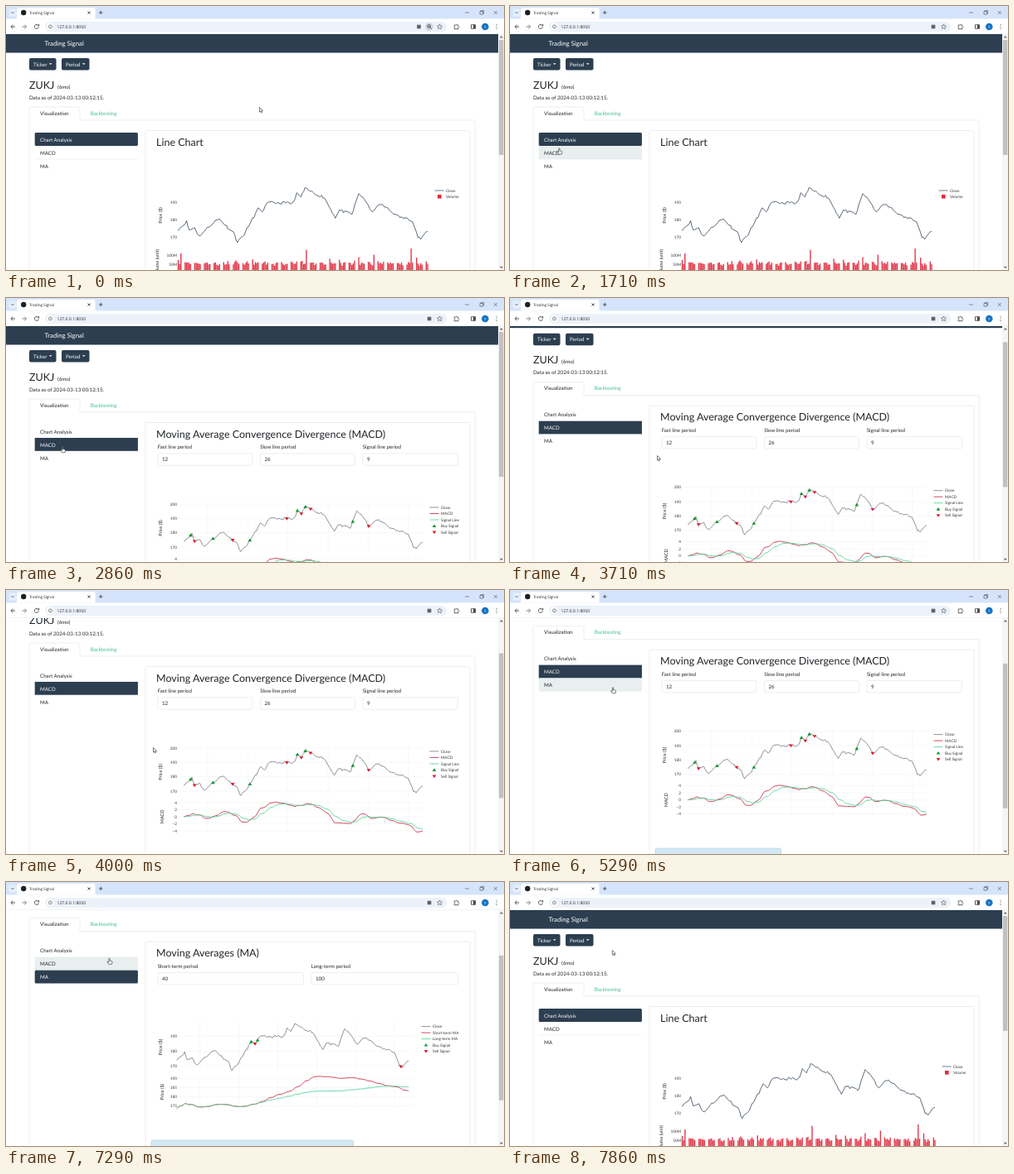
Animation of 600 by 319 pixels, one loop 8 s. Source, as an HTML page:

```html
<!DOCTYPE html>
<html lang="en">
<head>
<meta charset="utf-8">
<title>Trading Signal</title>
<style>
html, body { margin: 0; width: 100%; height: 100%; overflow: hidden; background: #fff; }
#stage { display: block; width: 600px; height: 319px; font: 6.2px Lato, sans-serif; text-rendering: geometricPrecision; }
text { fill: #212529; }
.ui { font-family: "Open Sans", sans-serif; }
.icon { fill: none; stroke: #474b50; stroke-width: .9; }
.thin { stroke-width: .6; }
.h { font-size: 12.5px; }
.white { fill: #fff; }
.dark { fill: #2c3e50; }
.edge { fill: none; stroke: #dee2e6; stroke-width: .6; }
.tick { font-size: 4.7px; fill: #333; }
.axis { font-size: 5.5px; fill: #222; text-anchor: middle; }
.grid { fill: none; stroke: #eef1f5; stroke-width: .5; }
.line { fill: none; stroke-width: .85; stroke-linejoin: round; }
.alert { fill: #d3e8f3; stroke: #a8cde0; stroke-width: .6; }
</style>
</head>
<body>
<svg id="stage" viewBox="0 0 600 319">
  <rect width="600" height="319" fill="#fff"/>

  <!-- browser window -->
  <g class="ui">
    <rect width="600" height="15.5" fill="#d5e4fb"/>
    <path d="M11 15.5Q13 15.5 13 13.5V4.5Q13 2 15.5 2H105Q107.500 2 107.500 4.500V13.500Q107.500 15.500 109.500 15.500Z" fill="#fff"/>
    <rect x="3.500" y="3.500" width="9" height="9" rx="2.500" fill="#e6effc"/>
    <circle cx="21.200" cy="8" r="3.200" fill="#202124"/>
    <text id="title" x="28" y="9.800" font-size="4.600">Trading Signal</text>
    <g class="icon">
      <path d="M6.500 7.300L8 8.800 9.500 7.300M98.500 6.500l3 3m0-3l-3 3M112 8h4.400M114.200 5.800v4.400"/>
      <path class="thin" d="M553 8h5M571 6.500h3.600v3.600h-3.600zM572.200 6.300v-.8h3.400v3.500h-.8M587.800 6l4 4m0-4l-4 4"/>
      <path d="M11 25H6m2.300-2.400L5.900 25l2.400 2.400"/>
      <path d="M19.500 25h5m-2.300-2.400l2.400 2.400-2.400 2.400" stroke="#777b80"/>
      <path d="M39.200 23.500A2.600 2.600 0 1 0 39.500 25.600M39.600 22v2h-2"/>
    </g>
    <rect x="47" y="19" width="484" height="12.200" rx="6.100" fill="#edf2fa"/>
    <circle cx="53.500" cy="25" r="4.400" fill="#fff"/>
    <g class="icon">
      <circle class="thin" cx="53.500" cy="25" r="2.100"/>
      <path class="thin" d="M53.500 24.700v1.300M53.500 23.600v.5"/>
      <path class="thin" d="M522.500 22l.9 2 2.100.2-1.600 1.400.5 2.100-1.900-1.100-1.900 1.100.5-2.100-1.600-1.400 2.100-.2z"/>
      <path d="M540.200 23h1.500q.8-1.700 1.600 0h1.600v1.600q1.600.8 0 1.600v1.600h-4.700v-1.500q1.400-.9 0-1.800z"/>
      <path d="M560.500 22.700h5v4.600h-5z"/>
    </g>
    <rect x="563" y="22.700" width="2.500" height="4.600" fill="#474b50"/>
    <text x="61.500" y="26.900" font-size="5.100">127.0.0.1:8050</text>
    <rect id="square" x="507.700" y="22.700" width="4.600" height="4.600" fill="#5f6368"/>
    <g id="zoom">
      <circle cx="510" cy="25" r="4.800" fill="#d0d7e2"/>
      <path class="icon" d="M511.100 26.100l1.700 1.700M511.500 24.500a1.900 1.900 0 1 1-3.800 0a1.900 1.900 0 1 1 3.800 0M508.700 24.500h1.800"/>
    </g>
    <circle cx="577.300" cy="25" r="4.300" fill="#1673c5"/>
    <text class="white" x="577.300" y="26.600" font-size="4.300" text-anchor="middle">Y</text>
    <path d="M591 22.600v.1m0 2.300v.1m0 2.300v.1" stroke="#474b50" stroke-linecap="round" stroke-width="1.100"/>
    <rect y="33.500" width="600" height=".5" fill="#e3e6ea"/>
  </g>

  <!-- web page -->
  <svg y="34" width="593" height="285" viewBox="0 34 593 285">
    <g id="page">
      <rect class="dark" y="33.500" width="593" height="23"/>
      <text class="white" x="46.500" y="48" font-size="7.800">Trading Signal</text>
      <rect class="dark" x="28" y="63" width="32.500" height="14.500" rx="2"/>
      <rect class="dark" x="67" y="63" width="33.500" height="14.500" rx="2"/>
      <text class="white" x="33" y="72.600">Ticker</text>
      <text class="white" x="72" y="72.600">Period</text>
      <path class="white" d="M51.800 69.200h3.800l-1.900 1.900zM91.800 69.200h3.800l-1.900 1.900z"/>
      <text class="h" x="28" y="99.500">ZUKJ</text>
      <text x="62" y="99.500">(6mo)</text>
      <text x="28" y="112.700">Data as of 2024-03-13 00:12:15.</text>
      <path class="edge" d="M28 700V124Q28 122 30 122H87Q89 122 89 124V138H565V700"/>
      <text x="41" y="131.600">Visualization</text>
      <text x="101.700" y="131.600" style="fill:#3fbf93">Backtesting</text>
      <path class="edge" d="M168 700V152.500Q168 150.500 170 150.500H557Q559 150.500 559 152.500V700"/>
      <g id="menu"></g>
      <g id="views"></g>
    </g>
  </svg>

  <!-- scrollbar -->
  <rect x="593" y="34" width="7" height="285" fill="#f5f5f5"/>
  <path d="M594.800 38.500h4l-2-2.600zM594.800 314.700h4l-2 2.600z" fill="#6f6f6f"/>
  <rect id="thumb" x="594" width="5.300" fill="#c1c1c1"/>

  <g id="pointer" fill="#fff" stroke="#111" stroke-width=".55" stroke-linejoin="round">
    <path id="arrow" d="M0 0V5.600L1.300 4.500 2.100 6.400 3 6 2.200 4.200H4Z"/>
    <path id="hand" d="M-.6.5Q0-.4.6.5V3L3 3.600Q3.700 3.900 3.600 4.700L3 7.300H-.6L-2.600 4.700Q-2.500 3.700-1.500 4.200L-.6 5Z"/>
  </g>
</svg>

<script>
const $ = id => document.getElementById(id);

// ---- data: a price path through a few turning points, with seeded jitter ----
const turns = [[0, 174.5], [6, 179], [8, 174], [12, 175.5], [15, 170.5], [26, 179], [30, 180.5], [36, 175.5],
  [40, 173], [43, 167], [47, 170.5], [58, 186.3], [61, 185], [65, 189.8], [84, 190], [86, 195.5], [89, 193.3],
  [92, 198], [106, 193], [111, 185.6], [114, 181.5], [117, 185.6], [126, 183], [131, 195], [135, 192.4],
  [140, 184.6], [147, 189.2], [160, 181.8], [170, 179.8], [174, 170], [176, 169], [181, 173.2]];

let seed = 11;
const random = () => (seed = seed * 16807 % 2147483647) / 2147483647;

function priceAt(day) {
  const j = Math.max(1, turns.findIndex(p => p[0] >= day));
  const [d0, p0] = turns[j - 1], [d1, p1] = turns[j];
  return p0 + (p1 - p0) * (day - d0) / (d1 - d0);
}

// Weekdays of half a year that starts on a Wednesday
const days = Array.from({ length: 182 }, (_, d) => d).filter(d => (d + 2) % 7 < 5);
const price = days.map(d => priceAt(d) + (random() - .5) * 1.6);

const ema = (list, span) => {
  let e = list[0];
  return list.map(v => e += (v - e) * 2 / (span + 1));
};
const mean = (list, n) => list.map((_, i) => {
  const part = list.slice(Math.max(0, i - n + 1), i + 1);
  return part.reduce((a, b) => a + b) / part.length;
});
const slow = ema(price, 26);
const macd = ema(price, 12).map((v, i) => v - slow[i]);

// Volume grows with the price move; a few days stand out
const peaks = { 2: 109, 93: 128, 142: 102, 169: 136 };
const volume = days.map((d, i) => peaks[d] || 40 + 18 * random() + 5 * Math.abs(price[i] - (price[i - 1] ?? 170)));

// ---- drawing helpers ----
const text = (x, y, s, cls = '', more = '') => `<text x="${x}" y="${y}" class="${cls}" ${more}>${s}</text>`;
const scaleX = (x0, x1) => d => x0 + d * (x1 - x0) / 181;
const scaleY = (base, y0, unit) => v => y0 - (v - base) * unit;
const range = (from, to, step) => Array.from({ length: (to - from) / step + 1 }, (_, i) => from + i * step);
const curve = (list, x, y, color) =>
  `<path class="line" stroke="${color}" d="M${list.map((v, i) => x(days[i]).toFixed(1) + ' ' + y(v).toFixed(1)).join('L')}"/>`;
const ticks = (list, y, unit = '') => list.map(v =>
  text(206, y(v) + 1.7, String(v).replace('-', '−') + unit, 'tick', 'text-anchor="end"')).join('');
const axisTitle = (x, y, s) => text(0, 0, s, 'axis', `transform="translate(${x} ${y}) rotate(-90)"`);
const mark = (x, y, up) => up
  ? `<path fill="#0d9430" d="M${x - 2.3} ${y + 1.5}h4.600l-2.300-3.700z"/>`
  : `<path fill="#e0162f" d="M${x - 2.3} ${y - 1.5}h4.600l-2.300 3.700z"/>`;
const marks = (list, up, x, y) => list.map(d => mark(x(d), y(priceAt(d)), up)).join('');
const grid = (x, right, levels) => '<path class="grid" d="' +
  range(18, 170, 30.4).map(d => `M${x(d)} 246V308M${x(d)} 311V352`).join('') +
  levels.map(y => `M207 ${y}H${right}`).join('') + '"/>';
const legend = (x, names, colors) => names.map((s, i) => {
  const y = 253 + 7.5 * i;
  const key = i < 3 ? `<path class="line" stroke="${colors[i]}" d="M${x} ${y}h11"/>` : mark(x + 5.5, y, i == 3);
  return key + text(x + 13.5, y + 1.7, s, 'tick');
}).join('');
const field = (x, w, label, value) => text(x - .3, 182, label) +
  `<rect class="edge" x="${x}" y="188" width="${w}" height="14.300" rx="2"/>` + text(x + 5, 197.4, value);
const heading = s => text(181, 168.7, s, 'h');
const alertBox = w => `<rect class="alert" x="175" y="390.500" width="${w}" height="22" rx="2"/>`;

const gray = '#7d7f83', red = '#c92a40', green = '#4fd39a', slate = '#3f4f60';

// ---- views ----
function lineView(right) {
  const x = scaleX(207.5, right), y = scaleY(170, 279.2, 2.08), v = scaleY(0, 323, .22), lx = right + 8.5;
  const bars = volume.map((n, i) => `M${(x(days[i]) - .7).toFixed(1)} 340V${v(n).toFixed(1)}h1.400V340z`).join('');
  return heading('Line Chart') + ticks(range(170, 190, 10), y) + ticks([50, 100], v, 'M') +
    axisTitle(188, 253, 'Price ($)') + axisTitle(184, 310, 'Volume (unit)') +
    `<path fill="#e23a4b" d="${bars}"/>` + curve(price, x, y, slate) +
    `<path class="line" stroke="#4f6f8f" d="M${lx} 223h11"/>` + text(lx + 13.5, 224.7, 'Close', 'tick') +
    `<rect x="${lx + 3.5}" y="228" width="4.600" height="4.600" fill="#e6283c"/>` + text(lx + 13.5, 232, 'Volume', 'tick');
}

function pairChart(x, right, [upper, y, buys, sells], [lower, m, title, fast, slowLine], keys) {
  return '<g class="chart">' + grid(x, right, [...upper.map(y), ...lower.map(m)]) +
    ticks(upper, y) + ticks(lower, m) + axisTitle(188, 278, 'Price ($)') + axisTitle(190, 332, title) +
    curve(price, x, y, gray) + curve(fast, x, m, red) + curve(slowLine, x, m, green) +
    marks(buys, true, x, y) + marks(sells, false, x, y) +
    legend(right + 8.5, ['Close', ...keys, 'Buy Signal', 'Sell Signal'], [gray, red, green]) + '</g>';
}

const macdView = () => heading('Moving Average Convergence Divergence (MACD)') +
  field(183, 114, 'Fast line period', 12) + field(306.5, 114, 'Slow line period', 26) +
  field(430, 114.5, 'Signal line period', 9) +
  pairChart(scaleX(214.5, 502), 502,
    [range(170, 200, 10), scaleY(170, 301, 1.73), [5, 22, 50, 86, 92, 128], [8, 37, 78, 89, 96, 140]],
    [range(-4, 4, 2), scaleY(0, 332, 4.25), 'MACD', macd, ema(macd, 9)], ['MACD', 'Signal Line']) +
  alertBox(151.5);

const maView = () => heading('Moving Averages (MA)') +
  field(183, 175.5, 'Short-term period', 40) + field(368, 176.5, 'Long-term period', 100) +
  pairChart(scaleX(206, 485), 492,
    [range(170, 190, 10), scaleY(170, 300.5, 1.775), [58, 63], [61, 175]],
    [range(175, 190, 5), scaleY(175, 349, 2.2), 'Price ($)', mean(price, 40), mean(price, 100)],
    ['Short-term MA', 'Long-term MA']) +
  alertBox(243.5);

$('views').innerHTML = [lineView(508), macdView(), maView(), lineView(512)].map(v => `<g>${v}</g>`).join('');
$('menu').innerHTML = ['Chart Analysis', 'MACD', 'MA'].map((s, i) =>
  `<g><rect x="34.700" y="${153 + 16 * i}" width="124.200" height="16" rx="${i == 1 ? 0 : 1.5}"/>` +
  text(41, 163.6 + 16 * i, s) + '</g>').join('') + '<path class="edge" d="M35 185H159" opacity=".7"/>';

// ---- motion, in steps of a seventh of a second ----
const ease = (k, from, to) => {
  const f = Math.min(1, Math.max(0, (k - from) / (to - from)));
  return f * f * (3 - 2 * f);
};

// Each move: first step, last step, where the pointer comes to rest
const moves = [[2, 12, 59.3, 171.8], [12, 15, 68, 179.5], [20, 26, 177.5, 190.5],
  [32, 36, 124, 117.5], [47, 51, 124.5, 92], [51, 54, 123.3, 82.5]];
const pointerAt = k => moves.reduce(([x, y], [from, to, x1, y1]) => {
  const f = ease(k, from, to);
  return [x + (x1 - x) * f, y + (y1 - y) * f];
}, [305.5, 122.5]);

const openMacd = 17, openMa = 39, maReady = 41, openLine = 55;
const scrollAt = k => k < openLine ? 78.4 * ease(k, 24, 30) : 0;

function itemAt(k) {
  const [x, y] = pointerAt(k), row = Math.floor((y + scrollAt(k) - 153) / 16);
  return x > 35 && x < 159 && row >= 0 && row < 3 ? row : -1;
}

const views = [...$('views').children], items = [...$('menu').children].slice(0, 3);
const show = (el, on) => el.style.display = on ? '' : 'none';

function draw(k) {
  const view = [openMacd, openMa, openLine].filter(s => k >= s).length;
  const [x, y] = pointerAt(k), scroll = scrollAt(k), over = itemAt(k);
  const hover = over == itemAt(k - 1) ? over : -1; // the highlight lags one step

  views.forEach((v, i) => show(v, i == view));
  show(views[2].querySelector('.chart'), k >= maReady);
  items.forEach((g, i) => {
    const active = i == view % 3;
    g.firstChild.style.fill = active ? '#2c3e50' : i == hover ? '#e9eeee' : '#fff';
    g.lastChild.style.fill = active ? '#fff' : '#212529';
  });
  $('page').setAttribute('transform', `translate(0 ${-scroll})`);
  $('thumb').setAttribute('y', 41 + .61 * scroll);
  $('thumb').setAttribute('height', view % 3 ? 175 : 139);
  $('title').textContent = k >= openMa - 1 && k < maReady ? 'Updating...' : 'Trading Signal';
  show($('zoom'), k < 2);
  $('square').setAttribute('x', k < 2 ? 495.2 : 507.7);
  $('pointer').setAttribute('transform', `translate(${x} ${y})`);
  show($('hand'), over >= 0);
  show($('arrow'), over < 0);
}

let start, last = 0;
function tick(now) {
  start ??= now;
  const k = Math.floor(((now - start) % 8000 + 6) * 7 / 1000) % 56;
  if (k != last) draw(last = k);
  requestAnimationFrame(tick);
}
draw(0);
requestAnimationFrame(tick);
</script>
</body>
</html>
```
